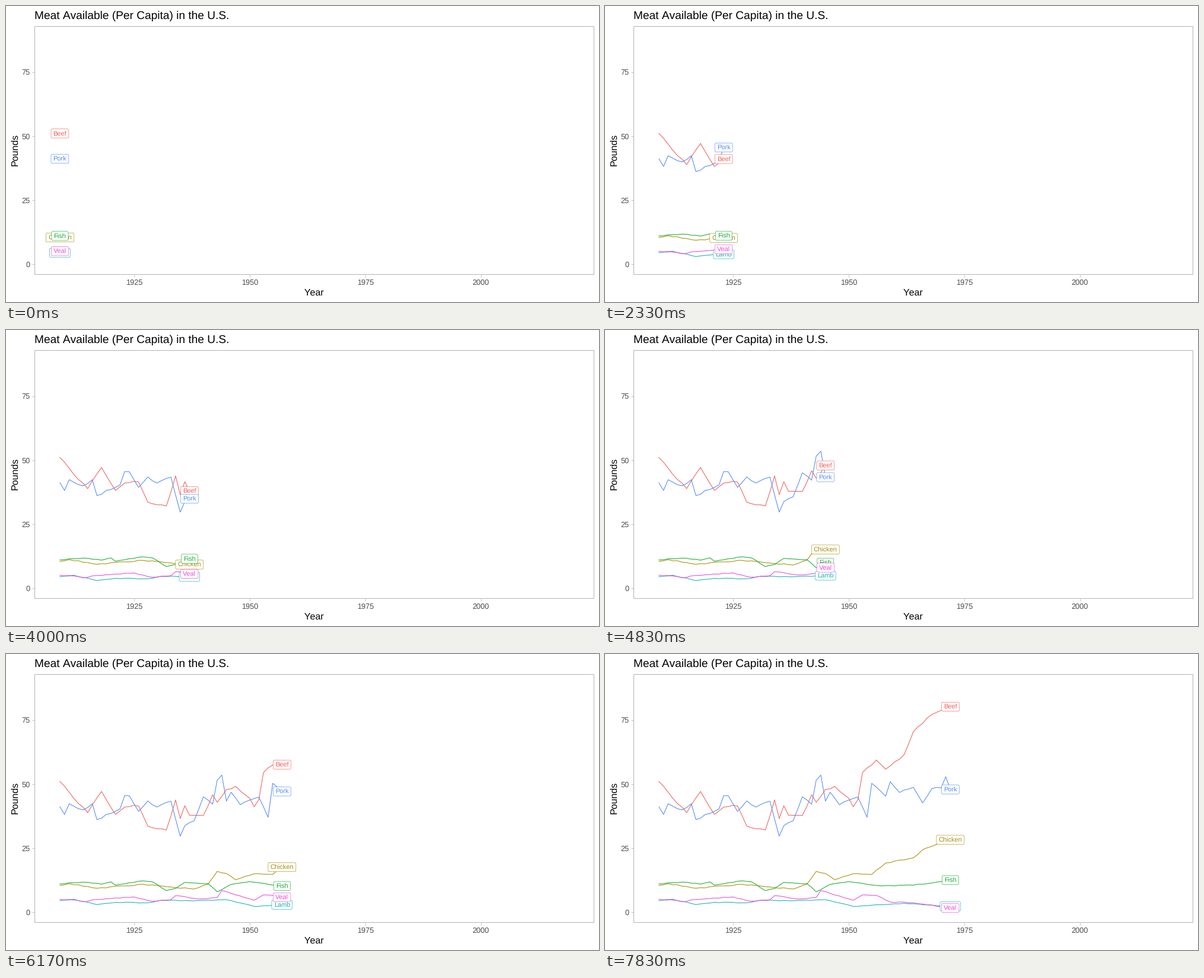
Animation, 1000 px wide and 500 px high, one loop 8000 ms. Source, as a matplotlib script:

```python
import matplotlib.pyplot as plt
import numpy as np
from matplotlib.animation import FuncAnimation
from matplotlib.patches import FancyBboxPatch, Rectangle

plt.rcParams["font.family"] = "Liberation Sans"
plt.rcParams["text.hinting"] = "none"
plt.rcParams["text.kerning_factor"] = 6    # practically no kerning

W, H, DPI = 1000, 500, 100
PT = 72 / DPI                      # points per pixel
LEFT, RIGHT, TOP, BOTTOM = 48, 992, 34, 454
FIRST_YEAR, SPAN, SHOWN = 1909, 110, 64
STEPS = 74                         # reveal steps over the whole span
HOLD = 5                           # steps to wait before the reveal
TICK_MS, LOOP_MS = 50, 8000
GREY, DARK = "#b3b3b3", "#4d4d4d"

rng = np.random.default_rng(7)
fig = plt.figure(figsize=(W / DPI, H / DPI), dpi=DPI, facecolor="white")
ax = fig.add_axes([0, 0, 1, 1])
ax.set_xlim(0, W)
ax.set_ylim(H, 0)
ax.axis("off")


def px(year):
    scale = (RIGHT - LEFT) / (1.1 * SPAN)
    return LEFT + (year - FIRST_YEAR + 0.05 * SPAN) * scale


def py(pounds):
    return 435.8 - 4.314 * pounds


def write(x, y, s, size, color="black", ha="center", **kw):
    return ax.text(x, y, s, fontsize=size * PT, color=color, ha=ha,
                   va="baseline", rotation_mode="anchor", **kw)


def tick(x, y):
    ax.plot(x, y, color=GREY, lw=0.8 * PT, solid_capstyle="butt", zorder=1)


def draw_axes():
    ax.add_patch(Rectangle((LEFT + 0.5, TOP + 0.5), RIGHT - LEFT - 1,
                           BOTTOM - TOP - 1, fill=False, ec=GREY, lw=PT,
                           snap=False, zorder=1))
    for year in range(1925, 2001, 25):
        tick([px(year)] * 2, [BOTTOM, BOTTOM + 4])
        write(px(year), 471, str(year), 12.8, DARK)
    for pounds in range(0, 76, 25):
        tick([LEFT - 4, LEFT], [py(pounds)] * 2)
        write(40.8, py(pounds) + 4.8, str(pounds), 12.8, DARK, "right")
    write(LEFT, 22, "Meat Available (Per Capita) in the U.S.", 19.2, ha="left")
    write((LEFT + RIGHT) / 2, 489, "Year", 16)
    write(19.6, (TOP + BOTTOM) / 2 - 1, "Pounds", 16, rotation=90)


def yearly(keys, wobble):
    """Straight runs between key points, with a little noise in between."""
    at, pounds = zip(*keys)
    years = np.arange(SHOWN)
    noise = rng.uniform(-wobble, wobble, SHOWN)
    noise[list(at)] = 0
    return np.interp(years, at, pounds) + noise


class Series:
    """A line that grows year by year with a name tag on its end."""

    PAD, CAP = 3.6, 8.1

    def __init__(self, name, color, order, wobble, keys):
        self.x = px(FIRST_YEAR + np.arange(SHOWN))
        self.y = py(yearly(keys, wobble))
        self.line, = ax.plot([], [], color=color, lw=1.07 * PT,
                             solid_joinstyle="round", zorder=2 + order / 10)
        self.text = write(0, 0, name, 11.04, color, zorder=3.5 + order)
        self.w = self.text.get_window_extent().width + 2 * self.PAD
        self.h = self.CAP + 2 * self.PAD
        self.box = FancyBboxPatch(
            (0, 0), self.w, self.h, boxstyle="round,pad=0,rounding_size=2.16",
            fc="white", ec=color, lw=0.6 * PT, zorder=3 + order)
        ax.add_patch(self.box)

    def show(self, last):
        self.line.set_data(self.x[:last + 1], self.y[:last + 1])
        x, y = self.x[last], self.y[last]
        self.box.set_x(x - self.w / 2)
        self.box.set_y(y - self.h / 2)
        self.text.set_position((x, y + self.CAP / 2))


draw_axes()

# Key points: (years since the first, pounds per person)
all_series = [
    Series("Beef", "#ef625b", 0, 0.4, [
        (0, 51.1), (3, 44.5), (6, 38.9), (9, 47.2), (12, 38.2), (14, 41.1),
        (17, 41.5), (19, 33.6), (23, 32.1), (25, 43.9), (26, 36.6),
        (27, 41.6), (28, 37.9), (31, 37.8), (33, 45.9), (34, 43), (36, 48),
        (38, 49.2), (41, 44.6), (42, 41.2), (43, 44), (44, 54.6), (47, 59.5),
        (49, 55.9), (53, 61.6), (55, 70.6), (59, 77.3), (63, 80.4)]),
    Series("Chicken", "#a88f08", 1, 0.2, [
        (0, 10.4), (2, 11.1), (8, 9.3), (18, 10.8), (29, 9), (32, 10.9),
        (34, 15.9), (36, 15.1), (38, 12.6), (42, 15), (46, 14.7), (49, 19.2),
        (55, 21.2), (57, 24.4), (63, 28.3)]),
    Series("Fish", "#18ad30", 2, 0.15, [
        (0, 11), (5, 11.7), (9, 10.9), (11, 11.8), (12, 10.5), (18, 12.2),
        (20, 11.8), (23, 8.4), (25, 9.2), (27, 11.6), (32, 11.1), (34, 7.9),
        (37, 10.8), (41, 11.9), (48, 10.2), (55, 10.5), (63, 12.5)]),
    Series("Lamb", "#17b3b7", 3, 0.12, [
        (0, 4.4), (3, 5), (8, 2.9), (12, 3.8), (19, 3.6), (22, 4.6),
        (28, 4.4), (36, 4.8), (42, 2.2), (53, 3.4), (63, 2.2)]),
    Series("Pork", "#528bfa", 4, 0.4, [
        (0, 41.2), (1, 38.2), (2, 42.4), (5, 40), (7, 42.4), (8, 36.2),
        (13, 40.4), (14, 45.6), (15, 45.5), (17, 39.4), (19, 43.5),
        (21, 41.1), (24, 43.4), (26, 29.7), (27, 33.8), (29, 35.7),
        (31, 45.1), (33, 42.2), (34, 51.6), (35, 53.6), (36, 43.4),
        (37, 46.9), (39, 42), (43, 45), (45, 37.1), (46, 50.4), (49, 45.3),
        (50, 51), (52, 46.8), (55, 48.8), (57, 42.7), (59, 48.3),
        (61, 48.6), (62, 53), (63, 48)]),
    Series("Veal", "#ea4adb", 5, 0.15, [
        (0, 5), (3, 4.7), (5, 4), (8, 4.9), (16, 5.9), (20, 4.2), (24, 4.8),
        (25, 6.4), (30, 5.1), (34, 5.7), (35, 8.4), (42, 4.6), (44, 6.7),
        (47, 6.5), (50, 3.9), (55, 3.6), (63, 1.6)]),
]


def update(i):
    # Three steps every half second
    step = 3 * (i // 10) + min(i % 10 // 3, 2)
    step = max(0, step - HOLD)
    last = int((step + 0.5) * SPAN / STEPS)
    for series in all_series:
        series.show(last)
    return []


anim = FuncAnimation(fig, update, frames=LOOP_MS // TICK_MS, interval=TICK_MS,
                     init_func=lambda: update(0), repeat=True, repeat_delay=0)
plt.show()
```
